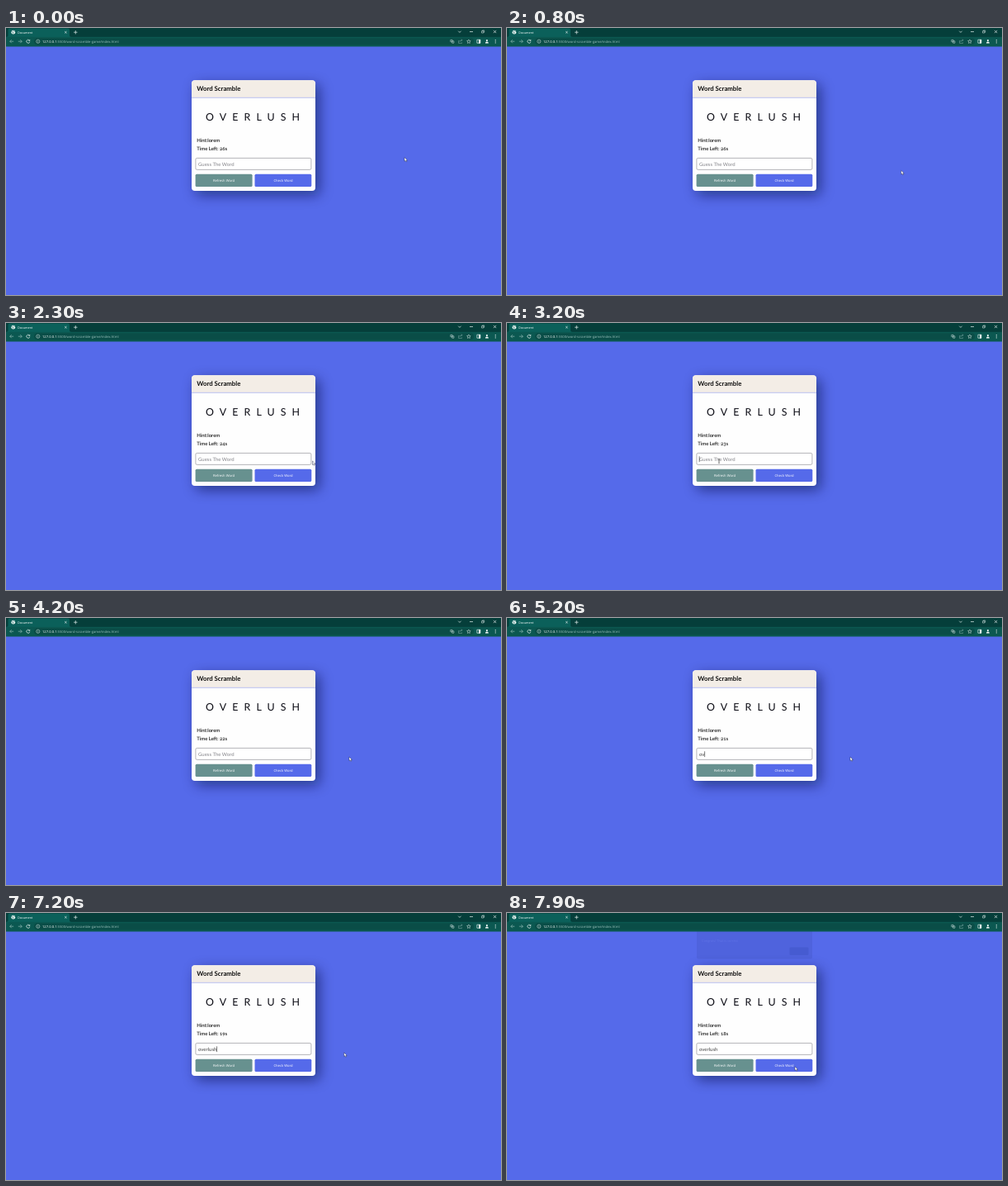
Recreate the animation shown at these times as an HTML page. Size 600 by 323 pixels, loop 8 s.

```html
<!DOCTYPE html>
<html lang="en">
<head>
<meta charset="utf-8">
<title>Word Scramble</title>
<style>
  html, body { margin: 0; width: 100%; height: 100%; overflow: hidden; background: #556aea; }
  svg { display: block; width: 100vw; height: 100vh; }
  text { text-rendering: geometricPrecision; }
  .ui { font-family: "Open Sans", "Noto Sans", sans-serif; }
  .page { font-family: Lato, "Open Sans", sans-serif; font-variant-numeric: oldstyle-nums; }
  .body { font-size: 6px; font-weight: 500; fill: #080808; }
  .line { fill: none; stroke: #e4f0ee; stroke-width: .7; }
  .thin { stroke-width: .5; }
  .dim { stroke: #8fb9b4; }
</style>
</head>
<body>
<svg viewBox="0 0 600 323" preserveAspectRatio="none">
  <defs>
    <filter id="shadow" x="-40%" y="-40%" width="180%" height="180%">
      <feGaussianBlur stdDeviation="8"/>
    </filter>
  </defs>

  <rect width="600" height="323" fill="#556aea"/>

  <!-- alert fading in -->
  <g id="alert" class="ui">
    <rect x="230" y="18" width="140" height="37.5" rx="2" fill="#26327a" opacity=".12"/>
    <rect x="342.5" y="41.5" width="23" height="9.5" rx="1.2" fill="#3a4fc0" opacity=".4"/>
    <text x="236" y="34.5" font-size="3.9" fill="#7183ee" opacity=".5">Congrats! That is correct</text>
  </g>

  <!-- game card -->
  <g class="page">
    <rect x="230" y="68.3" width="150" height="133.7" rx="4" fill="#060b38" opacity=".52" filter="url(#shadow)"/>
    <rect x="225" y="63.3" width="150" height="133.7" rx="4" fill="#fefefe"/>
    <path d="M225 84V67.3a4 4 0 0 1 4-4h142a4 4 0 0 1 4 4V84z" fill="#f3ede6"/>
    <path d="M225 84.3h150" stroke="#a9b3ee" stroke-width=".8"/>
    <text x="231.2" y="76.4" font-size="7.8" font-weight="700" fill="#111">Word Scramble</text>
    <text x="242" y="112.2" font-size="12.4" letter-spacing="7.1" fill="#0b0b14" id="word">OVERLUSH</text>
    <text class="body" x="231.2" y="138.1">Hint:lorem</text>
    <text class="body" x="231.2" y="148.2" id="timer"></text>
    <rect x="229.9" y="157.4" width="140" height="14" rx="1.6" fill="#fff" stroke="#96969c" stroke-width=".7"/>
    <text x="233" y="166.8" font-size="6" id="field"></text>
    <path id="caret" d="M0 161.3v6.8" stroke="#222" stroke-width=".6"/>
    <rect x="229.6" y="176.7" width="69" height="15.4" rx="1.6" fill="#67918f"/>
    <rect x="301.5" y="176.7" width="68.8" height="15.4" rx="1.6" fill="#556aea"/>
    <g class="ui" font-size="4.15" fill="#fff" text-anchor="middle">
      <text x="264" y="185.9">Refresh Word</text>
      <text x="336" y="185.9">Check Word</text>
    </g>
  </g>

  <!-- browser frame -->
  <g class="ui">
    <rect width="600" height="11" fill="#053e3a"/>
    <path d="M0 11c2 0 2.5-1 2.5-2.5v-6q0-2 2-2H75q2 0 2 2v6c0 1.5.5 2.5 2.5 2.5z" fill="#0b605a"/>
    <rect y="10.8" width="600" height="11.7" fill="#0b5851"/>
    <rect x="34" y="12.2" width="533" height="8.2" rx="4.1" fill="#0a4d47"/>
    <circle cx="8.8" cy="5.2" r="2.4" fill="#e4efed"/>
    <path d="M7.2 4.2l1.5.8-.4 1.8M9.2 3.4l1.2 1.2" stroke="#0b605a" stroke-width=".6" fill="none"/>
    <text x="14" y="6.7" font-size="3.75" fill="#fff">Document</text>
    <g class="line">
      <path d="M71.2 4l2.4 2.4m0-2.4l-2.4 2.4M84.3 3v4.4M82.1 5.2h4.4"/>
      <path d="M548.2 3.7l1.7 1.7 1.7-1.7M562 4.5h4M591 2.9l3.2 3.2m0-3.2L591 6.1"/>
      <path class="thin" d="M576.5 3.7h2.3V6h-2.3zM577.4 3.7v-.8h2.3v2.3h-.9"/>
      <path class="dim" d="M9.2 16.2H4.7m2-2l-2 2 2 2M14.8 16.2h4.5m-2-2l2 2-2 2"/>
      <path d="M28.4 15a2 2 0 1 0 .4 1.6M28.8 13.9v1.5h-1.5"/>
      <g class="thin">
        <path d="M38.8 16v1.3M38.8 14.9v.5M40.9 16.2a2.1 2.1 0 1 1-4.2 0a2.1 2.1 0 1 1 4.2 0"/>
        <path d="M538.8 14.4h2.3v2.3h-2.3zM540.7 15.8h2.2v2.4h-2.2z"/>
        <path class="dim" d="M549.6 15.4h-1v3h4v-1M550 16.7q.3-2 2.8-2m-1-1.2l1.2 1.2-1.2 1.2"/>
        <path d="M560.9 13.9l.7 1.5 1.6.2-1.2 1.1.3 1.7-1.4-.8-1.4.8.3-1.7-1.2-1.1 1.6-.2z"/>
      </g>
      <path d="M570.9 14.2h4v4h-4z"/>
    </g>
    <g fill="#f4faf9">
      <path d="M573 14h2v4.4h-2zM580.9 18.4q0-1.9 2-1.9t2 1.9z"/>
      <circle cx="582.9" cy="15.1" r="1.1"/>
      <path d="M592.8 14.1h.9v.9h-.9zM592.8 15.8h.9v.9h-.9zM592.8 17.5h.9v.9h-.9z"/>
    </g>
    <text x="44" y="17.7" font-size="4.15" fill="#9cc2bd"><tspan fill="#fff">127.0.0.1</tspan>:5500/word-scramble-game/index.html</text>
  </g>

  <path id="arrow" d="M0 0v4.7l1.1-1 .8 1.7.9-.4-.8-1.6h1.5z" fill="#fff" stroke="#151a38" stroke-width=".4"/>
  <path id="beam" d="M-1-2.8q1 0 1 .5v4.6q0 .5-1 .5M1-2.8q-1 0-1 .5v4.6q0 .5 1 .5" fill="none" stroke="#333" stroke-width=".4"/>
</svg>
<script>
  const LOOP = 8000, STEP = 100, SECOND = 985;
  const FIRST_TICK = 820, FOCUS = 2720, ALERT = 7900;
  const WORD = "overlush";
  const [timer, field, caret, arrow, beam, alertBox] =
    ["timer", "field", "caret", "arrow", "beam", "alert"].map(id => document.getElementById(id));

  // Pointer moves: start, end, x, y
  const START = [483, 156.5];
  const moves = [
    [0, 100, 480, 168],
    [700, 900, 477, 173.8],
    [1800, 2300, 371.5, 167],
    [2700, 2800, 257, 167],
    [3200, 3800, 416, 168],
    [6800, 7400, 409, 169],
    [7600, 7900, 349, 185.8]
  ];

  // Two bursts of four keystrokes
  const keyTime = i => 5000 + 800 * Math.floor(i / 4) + 130 * (i % 4);

  const clamp = v => Math.min(1, Math.max(0, v));
  const easeOut = k => 1 - (1 - k) ** 2;
  const show = (el, on) => el.setAttribute("visibility", on ? "visible" : "hidden");

  const pointerAt = t => moves.reduce(([px, py], [from, to, x, y]) => {
    const k = easeOut(clamp((t - from) / (to - from)));
    return [px + (x - px) * k, py + (y - py) * k];
  }, START);

  function draw(now) {
    const t = Math.floor((now % LOOP) / STEP) * STEP;

    timer.textContent = `Time Left: ${25 - Math.floor((t - FIRST_TICK) / SECOND)}s`;

    const typed = [...WORD].filter((_, i) => keyTime(i) <= t).join("");
    field.textContent = typed || "Guess The Word";
    field.setAttribute("fill", typed ? "#444" : "#85858a");

    // Each keystroke restarts the blink
    const end = typed ? field.getComputedTextLength() : 0;
    const blinkStart = typed ? keyTime(typed.length - 1) : FOCUS;
    caret.setAttribute("transform", `translate(${233.2 + end} 0)`);
    show(caret, t >= FOCUS && (t - blinkStart) % SECOND < SECOND / 2);

    const [x, y] = pointerAt(t);
    const inField = x > 229.5 && x < 370.5 && y > 157 && y < 172;
    for (const el of [arrow, beam]) el.setAttribute("transform", `translate(${x} ${y})`);
    show(arrow, !inField);
    show(beam, inField);

    show(alertBox, t >= ALERT);
  }

  function frame() {
    draw(performance.now());
    requestAnimationFrame(frame);
  }
  frame();
</script>
</body>
</html>
```
